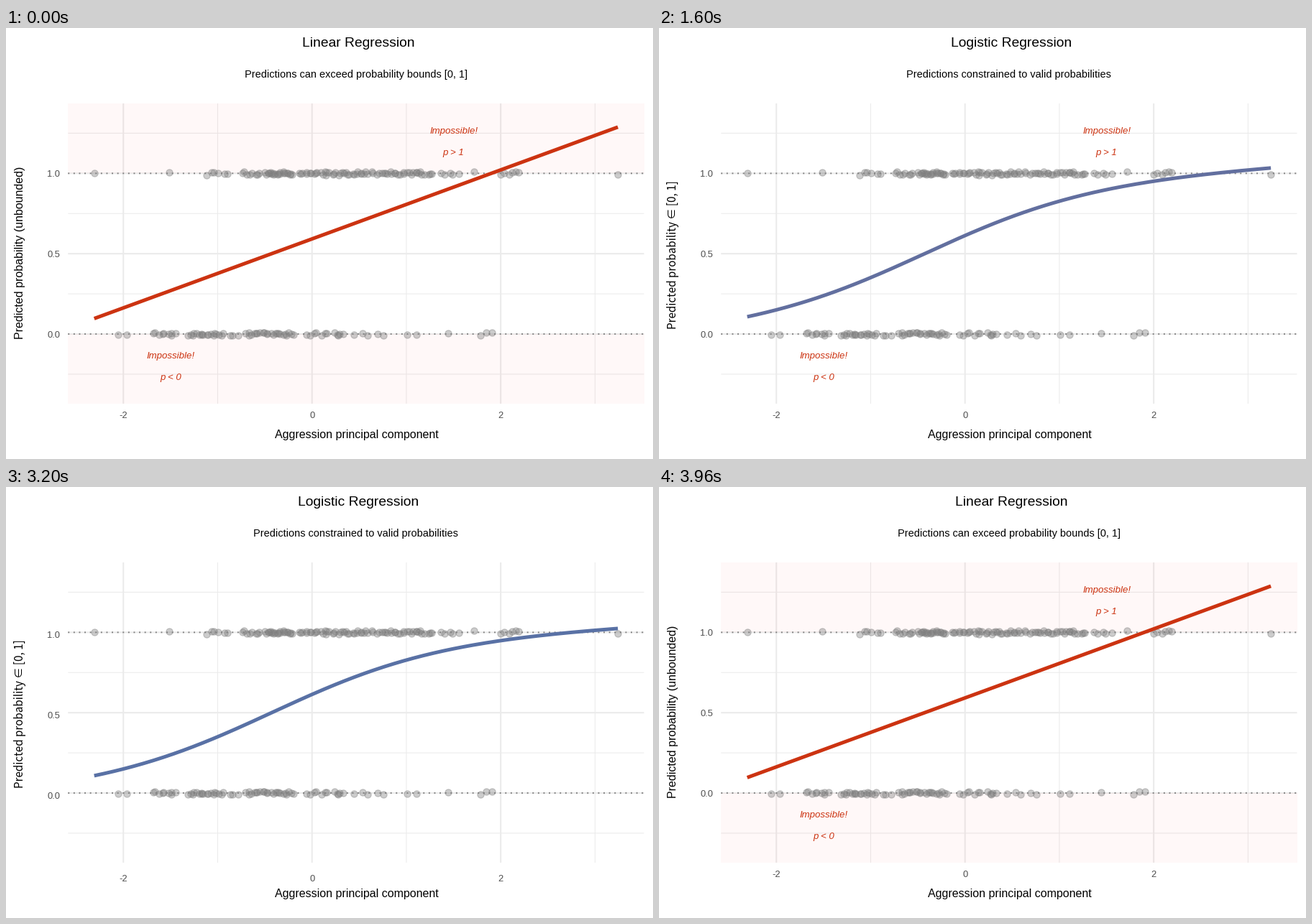
Animation of 900 by 600 pixels, one loop 4000 ms. Source, as a matplotlib script:

```python
import matplotlib.pyplot as plt
import numpy as np
from matplotlib.animation import FuncAnimation
from matplotlib.patches import Rectangle

W, H, DPI = 900, 600, 100
FRAMES, STEP = 100, 40
LEFT, RIGHT, TOP, BOTTOM = 86.3, 887.5, 105, 523
RED, BLUE = (204, 51, 17), (0, 119, 187)
SANS = "Liberation Sans"

# Last still frame and first settled frame of each transition
TO_CURVE = (21, 50)
TO_LINE = (71, 99)


def pt(px):
    return px * 72 / DPI


def sx(x):
    return 425.7 + 131.22 * x


def sy(y):
    return 426 - 223.65 * y


# Colour blending in Lab space
TO_XYZ = np.array([[0.4124564, 0.3575761, 0.1804375],
                   [0.2126729, 0.7151522, 0.0721750],
                   [0.0193339, 0.1191920, 0.9503041]])
WHITE = TO_XYZ.sum(axis=1)


def to_lab(rgb):
    c = np.array(rgb) / 255
    lin = np.where(c > 0.04045, ((c + 0.055) / 1.055) ** 2.4, c / 12.92)
    t = TO_XYZ @ lin / WHITE
    f = np.where(t > 0.008856, np.cbrt(t), 7.787 * t + 16 / 116)
    return np.array([116 * f[1] - 16, 500 * (f[0] - f[1]), 200 * (f[1] - f[2])])


def from_lab(lab):
    fy = (lab[0] + 16) / 116
    f = np.array([fy + lab[1] / 500, fy, fy - lab[2] / 200])
    t = np.where(f > 0.2069, f ** 3, (f - 16 / 116) / 7.787)
    lin = np.clip(np.linalg.solve(TO_XYZ, t * WHITE), 0, 1)
    return np.clip(np.where(lin > 0.0031308,
                            1.055 * lin ** (1 / 2.4) - 0.055, 12.92 * lin), 0, 1)


LAB_RED, LAB_BLUE = to_lab(RED), to_lab(BLUE)


def ease(p):
    return 4 * p ** 3 if p < 0.5 else 1 - 4 * (1 - p) ** 3


def ramp(n, span):
    return ease(min(max((n - span[0]) / (span[1] - span[0]), 0), 1))


fig = plt.figure(figsize=(W / DPI, H / DPI), dpi=DPI, facecolor="white")
ax = fig.add_axes([0, 0, 1, 1])
ax.set_xlim(0, W)
ax.set_ylim(H, 0)
ax.axis("off")


def rule(xs, ys, width, color, **kw):
    ax.plot(xs, ys, color=color, lw=pt(width), solid_capstyle="butt",
            dash_capstyle="butt", snap=False, **kw)


def label(x, y, s, px, color="black", ha="center", **kw):
    kw.setdefault("family", SANS)
    return ax.text(x, y, s, fontsize=pt(px), color=color, ha=ha,
                   va="baseline", zorder=6, **kw)


# Grid: thin lines at odd steps, thick ones at even steps
for i in range(-2, 4):
    rule([sx(i)] * 2, [TOP, BOTTOM], 1.03 if i % 2 else 2.07, "#EBEBEB", zorder=1)
for i in range(-1, 6):
    rule([LEFT, RIGHT], [sy(i / 4)] * 2, 1.03 if i % 2 else 2.07, "#EBEBEB",
         zorder=1)

# Out-of-range bands and dotted bounds
bands = [ax.add_patch(Rectangle((LEFT, a), RIGHT - LEFT, b - a, lw=0,
                                fc="red", alpha=0.027, zorder=2))
         for a, b in ((TOP, sy(1)), (sy(0), BOTTOM))]
for y in (0, 1):
    rule([LEFT, RIGHT], [sy(y)] * 2, 1.9, "#7F7F7F", ls=(0, (1, 3)), zorder=3)

# Observations: runs of (start, end, count) along each outcome
ONES = [(123, 123, 1), (227, 227, 1), (279, 308, 6), (329, 352, 8),
        (360, 398, 21), (408, 510, 37), (516, 592, 27), (605, 630, 5),
        (651, 651, 1), (688, 713, 6), (851, 851, 1)]
ZEROS = [(156, 168, 2), (205, 236, 9), (253, 302, 18), (312, 323, 3),
         (333, 400, 24), (418, 446, 7), (457, 469, 5), (484, 525, 5),
         (558, 571, 2), (615, 615, 1), (660, 676, 3)]
rng = np.random.default_rng(7)


def scatter_run(start, end, count, y):
    xs = np.linspace(start, end, count)
    gap = (end - start) / max(count - 1, 1)
    xs[1:-1] += rng.uniform(-0.7, 0.7, max(count - 2, 0)) * min(gap, 4)
    return np.column_stack([xs, sy(y + rng.uniform(-0.01, 0.01, count))])


dots = np.vstack([scatter_run(*run, y) for y, runs in ((1, ONES), (0, ZEROS))
                  for run in runs])
shade = (0.5, 0.5, 0.5, 0.4)
ax.scatter(*dots.T, s=pt(9.2) ** 2, facecolors=[shade], edgecolors=[shade],
           linewidths=pt(1.26), zorder=4)

# Fitted models
x = np.linspace(-2.309, 3.242, 160)
straight = 0.592 + 0.2147 * x
logistic = 1 / (1 + np.exp(-(0.477 + 1.114 * x)))
fit, = ax.plot(sx(x), sy(straight), lw=pt(5), solid_capstyle="butt", zorder=5)

# Text
title = label(490.2, 26, "", 19.3)
subtitle = label(486.5, 69, "", 14.47)
label(487.9, 571, "Aggression principal component", 16.05)
side = dict(rotation=90, rotation_mode="anchor")
y_line = label(24, 313, "Predicted probability (unbounded)", 16.05, **side)
y_curve = label(24, 315.5, "Predicted probability \u2208 [0, 1]", 15.2,
                family=["Noto Sans CJK JP", "DejaVu Sans"], **side)

x_ticks = [label(sx(v) + 0.2, 543, str(v), 12.9, "#4D4D4D") for v in (-2, 0, 2)]
y_ticks = [(label(75.5, 0, f"{v:.1f}", 12.9, "#4D4D4D", ha="right"),
            sy(v) + 4.6) for v in (0, 0.5, 1)]

notes = []
for nx, ny, claim in ((622.5, 147, "p > 1"), (229.3, 460, "p < 0")):
    for s, y in (("Impossible!", ny), (claim, ny + 30)):
        notes.append(label(nx, y, s, 13.23, "#CC3311", style="italic"))


def draw(n):
    k = ramp(n, TO_CURVE) - ramp(n, TO_LINE)
    fit.set_ydata(sy((1 - k) * straight + k * logistic))
    fit.set_color(from_lab((1 - k) * LAB_RED + k * LAB_BLUE))

    # Titles follow the nearer model
    curved = 36 <= n < 86
    title.set_text("Logistic Regression" if curved else "Linear Regression")
    subtitle.set_text("Predictions constrained to valid probabilities" if curved
                      else "Predictions can exceed probability bounds [0, 1]")
    y_line.set_visible(not curved)
    y_curve.set_visible(curved)

    for band in bands:
        band.set_visible(n <= TO_CURVE[0] or n >= TO_LINE[1])
    settled = TO_CURVE[1] <= n < TO_LINE[1]
    for note in notes:
        note.set_visible(not settled)
    for tick in x_ticks:
        tick.set_y(549 if settled else 543)
    for tick, y in y_ticks:
        tick.set_y(y + 3 * settled)
    return []


anim = FuncAnimation(fig, draw, frames=FRAMES, interval=STEP,
                     init_func=lambda: draw(0), repeat=True, repeat_delay=0)
plt.show()
```
